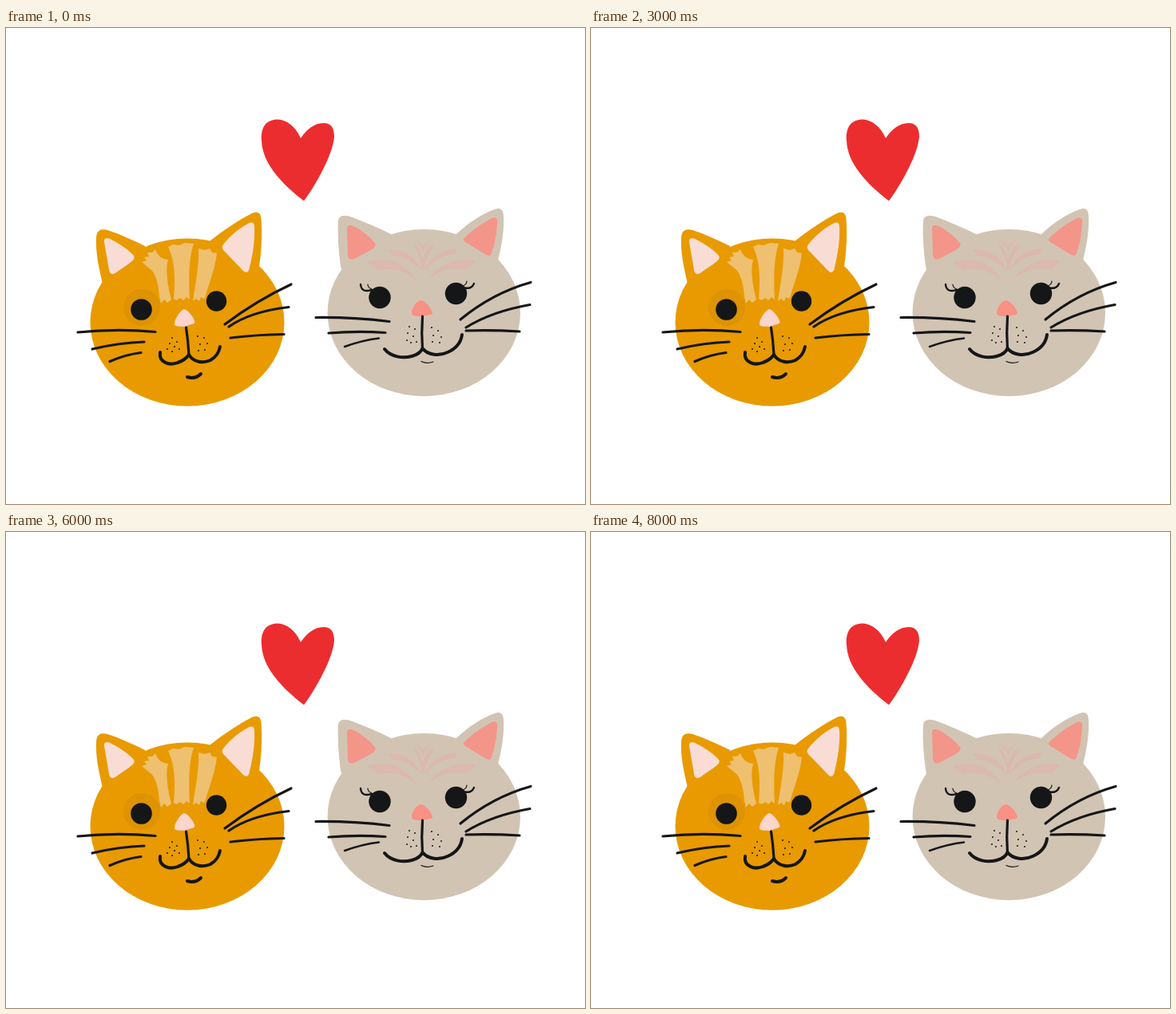
An HTML page that plays this animation: 725x596 px, repeating every 8500 ms.

```html
<!DOCTYPE html>
<html lang="en">
<head>
<meta charset="utf-8">
<title>Two cats and a heart</title>
<style>
  html, body { margin: 0; width: 100%; height: 100%; overflow: hidden; background: #fff; }
  svg { display: block; width: 725px; height: 596px; }

  .tilt { animation: tilt 8.5s step-end infinite; }
  .ginger { --turn: 8deg; transform-origin: 223.5px 352px; }
  .grey { --turn: 8deg; transform-origin: 522px 343px; }
  .heart { --turn: -8deg; transform-origin: 366px 165px; }

  /* 17 beats of half a second; every second one is tilted */
  @keyframes tilt {
    0%, 11.7646%, 23.5293%, 35.2940%, 47.0587%, 58.8234%, 70.5881%, 82.3528%, 94.1175%, 100% { transform: none; }
    5.8823%, 17.6469%, 29.4116%, 41.1763%, 52.9410%, 64.7057%, 76.4704%, 88.2351% { transform: rotate(var(--turn)); }
  }

  .ink { fill: #141617; }
  .line { fill: none; stroke: #141617; stroke-width: 4; stroke-linecap: round; stroke-linejoin: round; }
  .mid { stroke-width: 3.2; }
  .thin { stroke-width: 2.4; }
  .hair { stroke-width: 1.2; }
  .dots { fill: none; stroke: #141617; stroke-width: 2; stroke-linecap: round; }
</style>
</head>
<body>
<svg viewBox="0 0 725 596">
  <path class="tilt heart" fill="#ec2d2f" d="M369 138 C362 122 350 114 338 114.500 C324 116 319 126 320 141 C321 169 344 194 373 216.500 C380 208 409 163 411 136 C411 124 406 119 398 119 C385 119 376 128 369 138Z"/>

  <g class="tilt ginger">
    <g fill="#e89a00">
      <ellipse cx="227" cy="368.500" rx="121.500" ry="105"/>
      <path d="M121 320 C116 300 112 280 113 262 C114 253 119 251 127 253 C142 258 158 265 174 273 L174 330Z"/>
      <path d="M255 267 C274 252 292 240 308 232 C315 229 319 231 319.500 239 C321 257 320 279 317 299 L270 330Z"/>
    </g>
    <circle cx="170" cy="350" r="23" fill="#dd9302"/>
    <g fill="#f9ddd5">
      <path d="M123 268 C122 263 127 262 132 265 C144 271 155 279 160 285 C162 289 159 291 154 295 L138 306 C133 310 130 308 129 303Z"/>
      <path d="M273 270 C280 261 291 251 303 245 C309 242 311 244 311 249 C312 266 309 283 305 300 C304 306 301 308 296 303 L273 279 C270 276 270 273 273 270Z"/>
    </g>
    <g fill="#eec06f">
      <path d="M170 293 L176 291 L173 287 L179 286 L177 281 L183 281 L187 277 C190 285 194 289 203 290 C199 304 203 325 207 340 L202 344 L198 340 L194 345 L192 336 C191 322 188 309 182 303Z"/>
      <path d="M203 274 L209 271 L216 272 L224 269 L235 270 C228 291 229 317 230 340 L226 337 L222 341 L218 338 L214 341 L210 339 C212 316 212 293 203 274Z"/>
      <path d="M241 276 L249 278 L255 276 L258 281 L264 282 C262 302 253 322 249 339 L244 337 L242 342 L238 339 L234 342 C237 320 242 298 241 276Z"/>
    </g>
    <path fill="#fcd5cc" d="M211 371 C211 364 218 354 223 352 C228 353 235 362 236.500 368 C237 371 230 371 224 374 C218 373 212 375 211 371Z"/>
    <g class="ink"><circle cx="169.500" cy="352.500" r="13.300"/><circle cx="263.500" cy="342" r="12.700"/></g>
    <g class="line">
      <path class="mid" d="M225.500 375 Q228 391 229 409"/>
      <path d="M193 406 C191 419 205 423 215 419 Q224 416 229 409 C235 419 247 420 256 416 Q266 410 268 399"/>
      <path d="M227 437 Q237 440 244 433"/>
      <path class="mid" d="M90 381 Q138 376 187 380.500M108 402 Q142 394 173 393"/>
      <path class="mid" d="M130 417.500 Q149 409 169 406.500"/>
      <path class="mid" d="M357 321 Q314 341 274 371M354 349.500 Q306 355 279 374"/>
      <path class="mid" d="M348 383.500 Q314 384 281 388"/>
    </g>
    <path class="dots" d="M208 388h0M214 393h0M205 395h0M211 399h0M202 402h0M217 402h0M208 405h0M240 386h0M248 388h0M243 396h0M252 395h0M241 404h0M249 403h0"/>
  </g>

  <g class="tilt grey">
    <g fill="#d2c4b3">
      <ellipse cx="523.300" cy="356.500" rx="120.700" ry="104.500"/>
      <path d="M420 304 C416 280 415 255 416 241 C417 235 423 234 431 236 C449 243 466 250 484 259 L480 320Z"/>
      <path d="M563 259 C579 244 595 233 612 227 C619 224 623 227 623 236 C624 253 621 271 616 291 L570 320Z"/>
    </g>
    <g fill="#f4958a">
      <path d="M427 251 C427 246 432 246 437 249 C448 255 457 263 462 269 C464 273 461 275 457 278 L436 289 C431 291 429 289 428 284Z"/>
      <path d="M575 262 C585 252 597 244 609 238 C614 236 616 239 615 245 C614 260 612 270 608 282 C607 286 603 286 598 282 L575 268 C572 266 572 264 575 262Z"/>
    </g>
    <g fill="#dbb9ae">
      <path d="M453 293 C476 285 500 292 515 317 C498 302 480 299 466 304Z"/>
      <path d="M478 277 C499 276 516 288 521 305 C510 292 497 286 484 285Z"/>
      <path d="M508 269 C516 272 520 280 522 290 C525 279 530 272 538 270 C530 280 525 295 522 306 C520 292 516 279 508 269Z"/>
      <path d="M512 265 Q519 266 522 273 Q526 267 533 264 Q525 271 522 281 Q519 271 512 265Z"/>
      <path d="M524 305 C529 288 545 276 565 276 L561 284 C546 284 534 292 524 305Z"/>
      <path d="M588 291 C566 286 542 295 527 316 C545 301 562 299 576 303Z"/>
    </g>
    <path fill="#f99184" d="M508 357 C508 350 514 342 519 341 C525 341 532 350 534 356 C535 360 528 359 521 361 C514 361 508 361 508 357Z"/>
    <g class="ink"><circle cx="468" cy="337.500" r="13.700"/><circle cx="563.500" cy="332.500" r="13.700"/></g>
    <g class="line">
      <path class="thin" d="M458 328 Q445 332 444 321M572 325 Q583 328 586 320"/>
      <path class="hair" d="M458 327 Q453 325 453 321M572 323 Q577 321 577 317"/>
      <path class="mid" d="M521.500 361 Q520 382 521.500 402"/>
      <path d="M474 402 C482 412 497 414 508 411 Q519 408 521.500 401 C528 410 543 411 553 406 Q569 399 571 384"/>
      <path class="hair" d="M520 417.500 Q527 421 535 418"/>
      <path class="mid" d="M388 362.500 Q434 362 480 367.500M404 382 Q440 379 475 381.500"/>
      <path class="thin" d="M424 399 Q446 391 467 388.500"/>
      <path class="mid" d="M657 318.500 Q609 332 569 365M656 346.500 Q608 355 576 375"/>
      <path class="mid" d="M643 380 Q610 378 576 379"/>
    </g>
    <path class="dots" d="M505 374h0M512 377h0M503 382h0M510 386h0M502 391h0M514 393h0M507 394h0M533 375h0M541 379h0M535 385h0M545 387h0M534 393h0M543 394h0"/>
  </g>
</svg>
</body>
</html>
```
